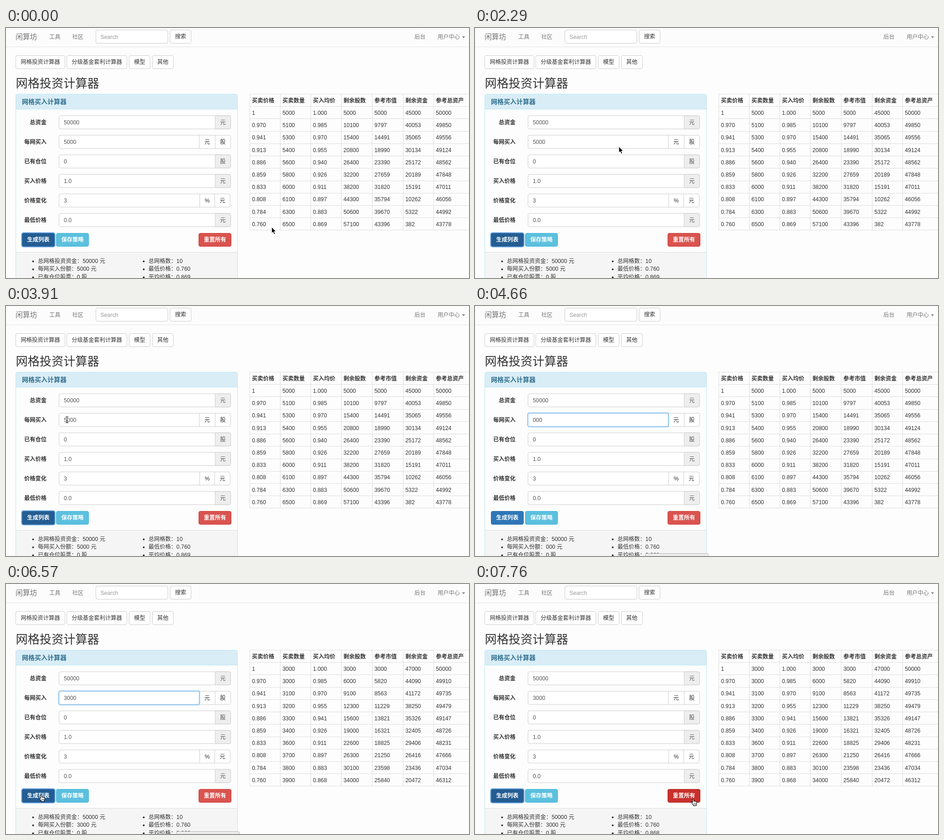
An HTML page for the animation above (8000 ms loop, 1017 by 550 pixels).

```html
<!DOCTYPE html>
<html lang="zh-CN">
<head>
<meta charset="utf-8">
<style>
html, body { margin: 0; width: 100%; height: 100%; overflow: hidden; background: #fdfdfd; }
svg { display: block; }
text { font-family: "Liberation Sans", "Noto Sans CJK SC", sans-serif; white-space: pre; }
</style>
</head>
<body>
<svg id="stage" width="1017" height="550" viewBox="0 0 1017 550"></svg>
<script>
const LOOP = 8000, SIZE = 12.28;

// Pointer steps: time, shape, position (arrow tip, beam centre, hand top left)
const POINTER = [
  [0, 'arrow', 583.5, 438], [140, 'arrow', 578, 432],
  [650, 'arrow', 562, 437], [800, 'arrow', 524, 446], [940, 'arrow', 486, 452], [1090, 'arrow', 477, 451],
  [1390, 'hand', 471, 453], [1540, 'hand', 468, 456], [1690, 'hand', 466, 457],
  [2140, 'arrow', 390, 345], [2290, 'arrow', 316, 261], [2430, 'beam', 309, 242],
  [2730, 'beam', 200, 239], [2870, 'beam', 154, 237],
  [3170, 'beam', 149, 238], [3320, 'beam', 144, 241], [3470, 'beam', 140, 244],
  [3610, 'beam', 137, 247], [3760, 'beam', 135, 249], [3910, 'beam', 134, 250],
  [4660, 'none', 0, 0], [5110, 'beam', 135, 252], [5250, 'arrow', 138, 271],
  [5400, 'beam', 142, 335], [5550, 'beam', 140, 416], [5700, 'hand', 130, 455],
  [5840, 'hand', 124, 461], [5990, 'hand', 76, 463], [6130, 'hand', 72, 463],
  [6870, 'hand', 118, 468], [7020, 'arrow', 215, 476], [7170, 'arrow', 310, 478],
  [7320, 'arrow', 398, 477], [7470, 'hand', 446, 471], [7610, 'hand', 462, 472], [7760, 'hand', 474, 472]
];
const FOCUS_FIELD = 4210, DELETE_DIGIT = 4360 + 300, TYPE_DIGIT = 4960, GENERATE = 6430, BLUR_FIELD = 6720;
const STEPS = [...POINTER.map(p => p[0]), FOCUS_FIELD, TYPE_DIGIT, GENERATE, BLUR_FIELD].sort((a, b) => a - b);

const SHAPES = {
  none: '',
  arrow: '<path d="M0 0V13.4L3.1 10.6L5.3 15.8L7.7 14.8L5.5 9.8H9.7Z" fill="#000" stroke="#fff" stroke-width="1"/>',
  beam: `<g fill="none"><path id="b" d="M-3 -7Q0 -7 0 -5Q0 -7 3 -7M0 -5V5M-3 7Q0 7 0 5Q0 7 3 7M-1.5 2H1.5" stroke="#fff" stroke-width="2.4"/>
    <path d="M-3 -7Q0 -7 0 -5Q0 -7 3 -7M0 -5V5M-3 7Q0 7 0 5Q0 7 3 7M-1.5 2H1.5" stroke="#222" stroke-width="1.1"/></g>`,
  hand: `<path d="M4 9V2Q4 .6 5.2 .6Q6.5 .6 6.5 2V6Q7.8 4.8 8.8 6.3Q10.2 5.3 11.1 6.9Q13.3 6.3 13.3 8.6Q13.4 11 12 13V15.6H5.4V14
    Q3.3 12 1 8.8Q.6 7.3 2 7.2Q3 7.4 4 9Z" fill="#fff" stroke="#000" stroke-width="1.1" stroke-linejoin="round"/>
    <path d="M6.7 10V13M8.8 10V13M10.9 10V13" stroke="#000" stroke-width=".8"/>`
};

const box = (x, y, w, h, fill, stroke = 'none', r = 0, extra = '') =>
  `<rect x="${x}" y="${y}" width="${w}" height="${h}" rx="${r}" fill="${fill}" stroke="${stroke}" ${extra}/>`;
const line = (x1, y1, x2, y2, color) => `<path d="M${x1} ${y1}L${x2} ${y2}" stroke="${color}"/>`;
// Text whose glyphs are centred vertically on cy
const text = (x, cy, s, { fill = '#333', size = SIZE, weight = 400, anchor = 'start' } = {}) =>
  `<text x="${x}" y="${cy + size * .36}" fill="${fill}" font-size="${size}" font-weight="${weight}" text-anchor="${anchor}">${s}</text>`;
const button = (x, y, w, label, fill = '#fff', stroke = '#ccc', style = {}) =>
  box(x + .5, y + .5, w - 1, 29, fill, stroke, 3.5) + text(x + w / 2, y + 15, label, { anchor: 'middle', ...style });

function gridRows(budget) {
  const floor = v => Math.floor(v + 1e-6), rows = [];
  let price = 1, shares = 0, cash = 50000;
  for (let i = 0; i < 10; i++) {
    const count = floor(budget / price / 100) * 100;
    shares += count;
    cash = floor(cash - count * price);
    const value = floor(shares * price);
    rows.push([i ? price.toFixed(3) : 1, count, ((50000 - cash) / shares).toFixed(3), shares, value, cash, value + cash]);
    price = Math.round(price * 970) / 1000;
  }
  return rows;
}

function header() {
  const gray = { fill: '#777' };
  return box(0, 0, 1017, 41, '#fcfcfc') + line(0, 41.5, 1017, 41.5, '#e4e4e4') +
    text(21, 19.5, '闲算坊', { fill: '#777', size: 15.8 }) +
    text(95, 19.5, '工具', gray) + text(145.5, 19.5, '社区', gray) +
    box(197.5, 4.5, 158, 29, '#fff', '#ccc', 3.5) + text(207.5, 19.5, 'Search', { fill: '#999' }) +
    button(360, 4, 47, '搜索') + text(897, 19.5, '后台', gray) + text(948, 19.5, '用户中心', gray) +
    '<path d="M1001.5 18.5h7l-3.5 3.5z" fill="#777"/>' +
    button(21, 60, 109, '网格投资计算器') + button(133, 60, 133, '分级基金套利计算器') +
    button(270, 60, 47, '模型') + button(321, 60, 47, '其他') +
    text(21.5, 121.5, '网格投资计算器', { size: 26.2, weight: 500 });
}

function form(amount, focused) {
  const fields = [['总资金', '50000', '元'], ['每网买入', amount, '元', '股'], ['已有仓位', '0', '股'],
    ['买入价格', '1.0', '元'], ['价格变化', '3', '%', '元'], ['最低价格', '0.0', '元']];
  return fields.map(([label, value, unit, unit2], i) => {
    const cy = 207.5 + 43 * i, top = cy - 15, right = i === 4 ? 492.5 : 493.5;
    const split = unit2 ? (i === 4 ? 425.5 : 424.5) : 459.5, split2 = i === 4 ? 458.5 : 459.5;
    let s = text(89, cy, label, { weight: 700, anchor: 'end' }) +
      box(116.5, top + .5, right - 116.5, 29, '#fff', '#ccc', 3.5);
    if (!unit2) s += `<path d="M459.5 ${top + .5}H490a3.5 3.5 0 0 1 3.5 3.5v22a3.5 3.5 0 0 1 -3.5 3.5H459.5z" fill="#eee" stroke="#ccc"/>`;
    else s += line(split, top, split, top + 30, '#ccc') + line(split2, top, split2, top + 30, '#ccc') +
      text((split2 + right) / 2, cy, unit2, { anchor: 'middle' });
    if (i === 1 && focused) s += box(115.5, top - .5, 310, 31, 'none', '#66afe9', 4, 'stroke-width="3" opacity=".35"') +
      box(116.5, top + .5, 308, 29, '#fff', '#66afe9', 3);
    return s + text((split + (unit2 ? split2 : right)) / 2, cy, unit, { anchor: 'middle', fill: unit2 ? '#333' : '#555' }) +
      text(127, cy, value, { fill: '#555' });
  }).join('');
}

function table(rows) {
  const xs = [535.5, 602.5, 669.5, 736.5, 804.5, 872.5, 939.5], step = 27.22;
  const titles = ['买卖价格', '买卖数量', '买入均价', '剩余股数', '参考市值', '剩余资金', '参考总资产'];
  let s = xs.map(x => line(x, 145, x, 445, '#ddd')).join('');
  for (let i = 0; i < 12; i++) {
    const y = Math.round(145 + step * i) + .5;
    s += line(535, y, 1017, y, '#ddd');
  }
  [titles, ...rows].forEach((row, i) => row.forEach((cell, j) =>
    s += text(xs[j] + 4.8, 159.2 + step * i, cell, { weight: i ? 400 : 700 })));
  return s;
}

function summary(amount, average) {
  const left = ['总网格投资资金：50000 元', `每网买入份额：${amount} 元`, '已有仓位股票：0 股'];
  const right = ['总网格数：10', '最低价格：0.760', '平均价格：' + average];
  const column = (x, items) => items.map((s, i) =>
    `<circle cx="${x - 10.5}" cy="${513.5 + 17.5 * i}" r="2" fill="#333"/>` + text(x, 512.5 + 17.5 * i, s)).join('');
  return box(22, 494, 486, 60, '#f5f5f5') + line(22, 493.5, 508, 493.5, '#ddd') + column(70, left) + column(313, right);
}

function draw(t) {
  const [, kind, px, py] = POINTER.filter(p => p[0] <= t).pop();
  const hotX = kind === 'hand' ? px + 5 : px;
  const over = (x, w) => kind !== 'none' && hotX >= x && hotX <= x + w && py >= 451 && py <= 481;
  const editing = t >= FOCUS_FIELD && t < BLUR_FIELD;
  const ring = t < FOCUS_FIELD || t >= GENERATE;
  const amount = t < DELETE_DIGIT ? '5000' : t < TYPE_DIGIT ? '000' : '3000';
  const rows = gridRows(t < GENERATE ? 5000 : 3000);
  const white = { fill: '#fff', weight: 700 };
  const action = (x, label, [fill, stroke], [hotFill, hotStroke], forced) => {
    const hot = forced || over(x, 72);
    return button(x, 451, 72, label, hot ? hotFill : fill, hot ? hotStroke : stroke, white);
  };

  stage.innerHTML = header() +
    box(21.5, 145.5, 487, 420, '#fdfdfd', '#bce8f1', 3.5) +
    box(22, 146, 486, 33, '#d9edf7', 'none', 3) + line(22, 178.5, 508, 178.5, '#bce8f1') +
    text(35, 161.5, '网格买入计算器', { fill: '#31708f', size: 14.03, weight: 700 }) +
    form(amount, editing) +
    action(35, '生成列表', ['#2f77b8', '#2e6da4'], ['#245d93', '#204d74'], ring) +
    (ring ? box(34.5, 450.5, 73, 31, 'none', '#5b9fe6', 4, 'stroke-width="2.2" opacity=".9"') : '') +
    action(110, '保存策略', ['#5bc0de', '#46b8da'], ['#2aadd5', '#269abc']) +
    action(423, '重置所有', ['#d9534f', '#d43f3a'], ['#c9302c', '#ac2925']) +
    summary(amount, rows[9][2]) + table(rows) +
    (editing ? box(374.5, 544.5, 138, 12, '#ececec', '#b5b5b5', 3) : '') +
    `<g transform="translate(${px} ${py})">${SHAPES[kind]}</g>`;
}

const stage = document.getElementById('stage');
let shown = -1;
function tick() {
  const t = performance.now() % LOOP;
  const step = STEPS.filter(s => s <= t).pop();
  if (step !== shown) draw(shown = step);
  requestAnimationFrame(tick);
}
tick();
</script>
</body>
</html>
```
